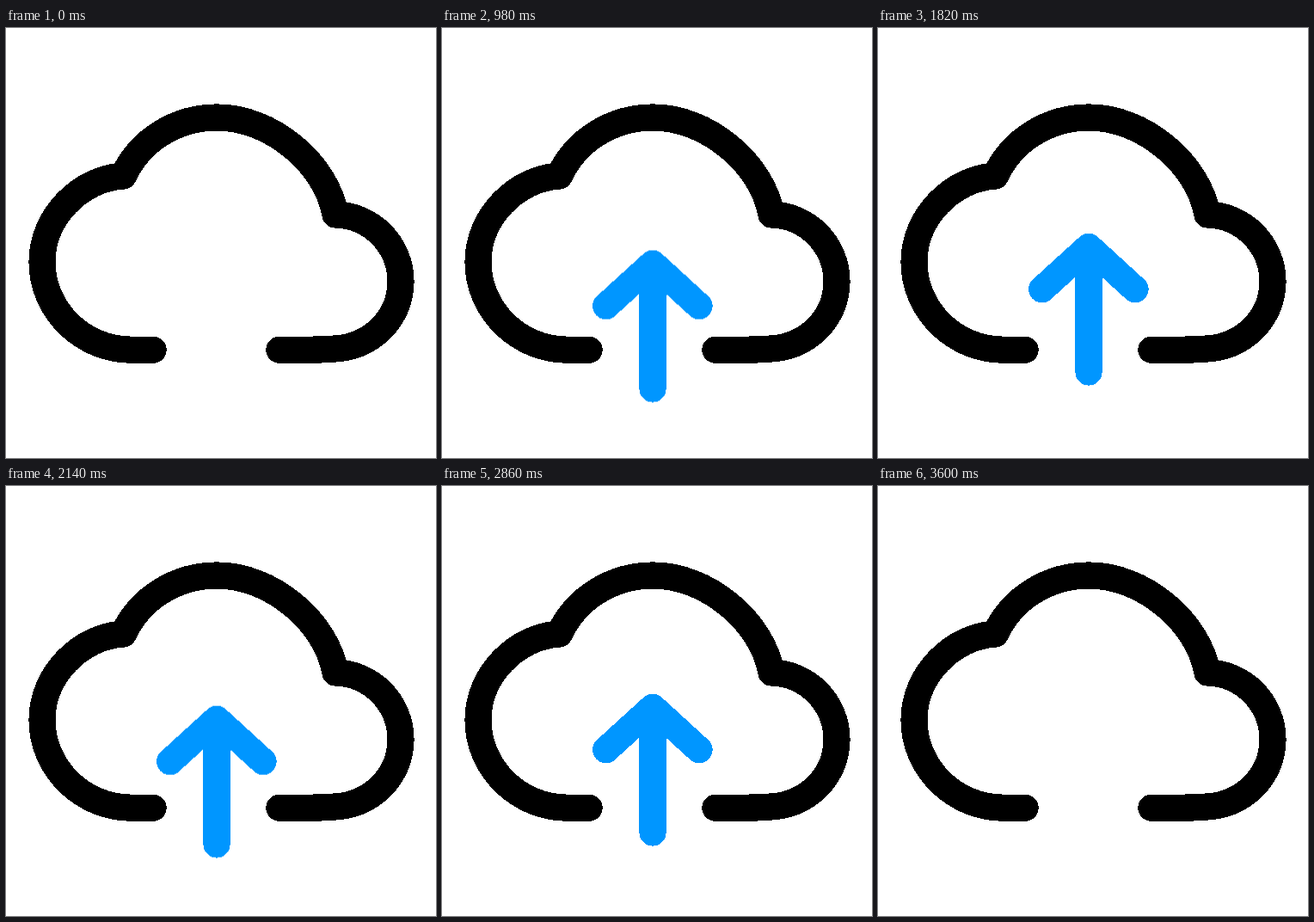
An HTML page for the animation above (3620 ms loop, 500 by 500 pixels).

```html
<!DOCTYPE html>
<html lang="en">
<head>
<meta charset="utf-8">
<title>Cloud upload</title>
<style>
  html, body { margin: 0; width: 100%; height: 100%; overflow: hidden; background: #fff; }
  svg { display: block; width: 100%; height: 100%; }
  path {
    fill: none;
    stroke: #000;
    stroke-width: 31.2px;
    stroke-linecap: round;
    stroke-linejoin: round;
    shape-rendering: crispEdges;
  }
  .arrow {
    stroke: #0096ff;
    animation: bob 3620ms ease-in-out infinite, show 3620ms step-end infinite;
  }
  /* 600 ms per half swing, then a 20 ms rest */
  @keyframes bob {
    0%, 33.149%, 66.298%, 99.448%, 100% { transform: translateY(27px); }
    16.575%, 49.724%, 82.873% { transform: translateY(0); }
  }
  @keyframes show {
    0% { visibility: hidden; }
    3.31% { visibility: visible; }
    92.81%, 100% { visibility: hidden; }
  }
</style>
</head>
<body>
<svg viewBox="0 0 500 500">
  <path d="M171.1 374.2H146
    C89 374.2 42 328 42 272
    C42 220 86 175 136.5 172
    C156 130 198 104 246 104
    C307 104 372 156 383 217
    C425 218 459 252 459 295
    C459 337 425 371 382 373
    C372 373.8 362 374.2 352 374.2
    H317.9"/>
  <path class="arrow" d="M190.7 303.7L245 254.3L299 303.7M245 254.3V400"/>
</svg>
</body>
</html>
```
